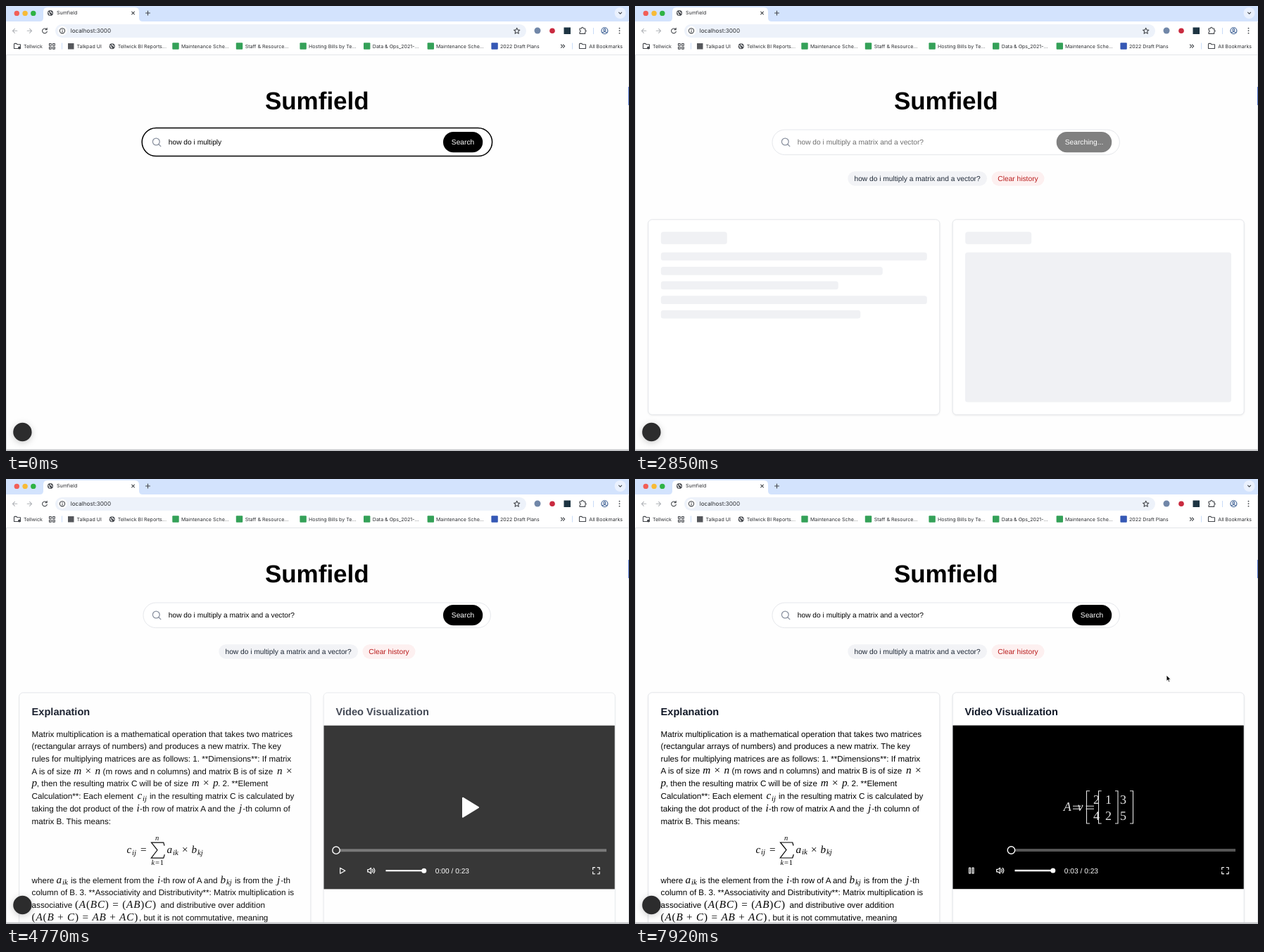
These frames come from a looping animation (885 px wide and 633 px high, 8000 ms). An HTML page:

```html
<!DOCTYPE html>
<html lang="en">
<head>
<meta charset="utf-8">
<title>Sumfield</title>
<style>
html, body { margin: 0; width: 100%; height: 100%; overflow: hidden; background: #fefefe; }
svg { display: block; width: 885px; height: 633px; font-family: "Liberation Sans", Arial, sans-serif; text-rendering: geometricPrecision; }
text { white-space: pre; }
.ui { font: 7.05px Inter, sans-serif; fill: #2b2d31; }
.icon { fill: none; stroke: #45484d; stroke-width: 1.1; stroke-linecap: round; stroke-linejoin: round; }
.small { font-size: 10.21px; }
.body { font-size: 11.67px; }
.title { font-size: 14.58px; font-weight: bold; fill: #111827; }
.math { font-family: "Liberation Serif", serif; letter-spacing: .8px; }
.sub { font-style: italic; letter-spacing: 0; }
.it { font-style: italic; }
.card { fill: #fff; stroke: #e3e5e9; filter: drop-shadow(0 1px 1px #0001); }
.bone { fill: #f0f1f4; }
.line { fill: none; stroke: #fff; stroke-width: 1.2; stroke-linejoin: round; stroke-linecap: round; }
.board { font: 18px "Liberation Serif", serif; fill: #e4e4e4; stroke: #e4e4e4; stroke-width: .8; }
.board path { fill: none; stroke-width: 1.1; }
.board > * { stroke-dasharray: 60; }
</style>
</head>
<body>
<svg viewBox="0 0 885 633">
  <defs>
    <clipPath id="page"><rect x="0" y="70" width="885" height="561"/></clipPath>
    <clipPath id="historyClip"><rect id="historyBox" x="200" y="230" width="500" height="28"/></clipPath>
    <g id="globe"><circle r="4" fill="#4a4d52"/><path d="M-3-1.2Q-1 0-1.6 1.4L0 3M.2-3.2Q-.4-1 1.5-.8L3 .6" fill="none" stroke="#fff" stroke-width="1.1"/></g>
    <path id="folder" class="icon" d="M0 1.2V7.5H9V1.8H4.6L3.4.4H.5Z"/>
  </defs>
  <rect width="885" height="633" fill="#fefefe"/>

  <g id="chrome">
    <rect width="885" height="34" fill="#d3e3fd"/>
    <path d="M0 22H48Q53 22 53 17V8Q53 2 59 2H183Q189 2 189 8V17Q189 22 194 22H885V69H0Z" fill="#fff"/>
    <path d="M0 69.5H885" stroke="#e4e6ea"/>
    <circle cx="15.3" cy="10.4" r="3.7" fill="#f25f57"/><circle cx="27.1" cy="10.4" r="3.7" fill="#f8bb36"/><circle cx="38.8" cy="10.4" r="3.7" fill="#2fb344"/>
    <use href="#globe" x="63" y="10"/>
    <path class="icon" d="M178.7 8.2l3.7 3.7m0-3.7l-3.7 3.7M198.5 10h6m-3-3v6"/>
    <circle cx="872.5" cy="10" r="8" fill="#eaf1fe"/>
    <path class="icon" d="M870.6 9.2l2 2 2-2"/>
    <path class="icon" style="stroke:#b0b3b8" d="M15.8 35.3H9.4m3-3l-3 3 3 3M30.2 35.3h6.4m-3-3l3 3-3 3"/>
    <path class="icon" d="M57.6 33.2a3.4 3.4 0 1 0 .7 3.2M58.2 31.4v2.4h-2.4"/>
    <rect x="70" y="26" width="669" height="19" rx="9.5" fill="#edf2fa"/>
    <circle cx="80" cy="35.3" r="6.8" fill="#fff"/>
    <circle class="icon" cx="80" cy="35.3" r="3.6"/><path class="icon" d="M80 35v2M80 33.4v.1"/>
    <path class="icon" d="M725.7 31.2l1.2 2.7 3 .3-2.2 2 .6 3-2.6-1.6-2.6 1.6.6-3-2.2-2 3-.3z"/>
    <circle cx="755" cy="35" r="4.5" fill="#7187a8"/><circle cx="776" cy="35.3" r="3.8" fill="#c92a3f"/>
    <rect x="792.5" y="30.5" width="9.5" height="9.5" fill="#1d3442"/>
    <path class="icon" d="M815 32h2.5q0-1.8 1.3-1.8t1.3 1.8h2.6v2.4q1.4 0 1.4 1.2t-1.4 1.2v2.6H815v-2.4q1.3 0 1.3-1.2T815 34.5z"/>
    <path d="M834.5 31v9M79.5 52.5v9M804.5 52.5v9" stroke="#c9dcf8"/>
    <g class="icon" style="stroke:#33588f"><circle cx="850.4" cy="35.2" r="4.5"/><circle cx="850.4" cy="34" r="1.5"/><path d="M847.4 38q3-2.4 6 0"/></g>
    <g fill="#45484d"><circle cx="871.5" cy="31.7" r=".9"/><circle cx="871.5" cy="35.2" r=".9"/><circle cx="871.5" cy="38.7" r=".9"/></g>
    <use href="#folder" x="11.5" y="53"/><circle cx="19" cy="59.5" r="2" fill="#45484d"/>
    <path class="icon" d="M61.5 53.5h2.8v2.8h-2.8zM66.5 53.5h2.8v2.8h-2.8zM61.5 58.3h2.8v2.8h-2.8zM66.5 58.3h2.8v2.8h-2.8z"/>
    <rect x="88" y="53" width="8.5" height="8.5" fill="#56585c"/>
    <use href="#globe" x="150.7" y="57.2"/>
    <use href="#folder" x="814.5" y="53"/>
    <path class="icon" d="M788.5 55l2.2 2.2-2.2 2.2m3-4.4l2.2 2.2-2.2 2.2"/>
  </g>

  <g clip-path="url(#page)">
    <text x="441.8" y="147" text-anchor="middle" font-size="35" font-weight="bold">Sumfield</text>
    <rect id="field" fill="#fff"/>
    <g fill="none" stroke="#8c93a1" stroke-width="1.3" stroke-linecap="round"><circle cx="213.3" cy="193" r="4.9"/><path d="M217 196.8l2.8 2.8"/></g>
    <text id="query" class="small" x="230.8" y="197.2"></text>
    <rect id="caret" y="187.5" width="1" height="12.5"/>
    <rect id="button" y="179" height="29.3" rx="14.6"/>
    <text id="buttonText" class="small" y="197.2" text-anchor="middle" fill="#fff"></text>

    <g id="history" clip-path="url(#historyClip)" class="small" text-anchor="middle">
      <g class="pill"><rect x="302.3" y="235.2" width="197.7" height="20.6" rx="10.3" fill="#f2f3f6"/><text x="401.1" y="249" fill="#1f2937">how do i multiply a matrix and a vector?</text></g>
      <g class="pill"><rect x="506.5" y="235.2" width="75" height="20.6" rx="10.3" fill="#fdf0f0"/><text x="544" y="249" fill="#b91c1c">Clear history</text></g>
    </g>
    <g id="skeleton"></g>

    <g id="explanation">
      <rect class="card" x="18.8" y="303.8" width="414" height="400" rx="5.5"/>
      <text class="title" x="36.6" y="336.3">Explanation</text>
    </g>

    <g id="video">
      <rect class="card" x="451.2" y="303.8" width="414" height="400" rx="5.5"/>
      <text class="title" x="468.6" y="336.3">Video Visualization</text>
      <rect x="451.5" y="350.5" width="413.2" height="232.7"/>
      <path id="bigPlay" d="M649 453.5L671 467 649 480.5Z" fill="#fff" stroke="#fff" stroke-width="2" stroke-linejoin="round"/>
      <g class="board" id="matrix">
        <text x="608.7" y="471.8" class="it">A</text><path d="M622 465.3h11.5M622 469.3h11.5"/>
        <path d="M646 443.7H641.5V490H646"/><text x="651" y="461.8">2</text><text x="689" y="461.8">3</text>
        <text x="651" y="485">4</text><text x="689" y="485">5</text><path d="M703 443.7H707.5V490H703"/>
      </g>
      <g class="board" id="vector">
        <text x="628.6" y="471.8" class="it">v</text><path d="M640.5 465.3h11.5M640.5 469.3h11.5"/>
        <path d="M662.7 443.7H658.5V490H662.7"/><text x="668" y="461.8">1</text><text x="668" y="485">2</text>
        <path d="M682 443.7H686V490H682"/>
      </g>
      <path id="track" stroke="#555" stroke-width="4"/>
      <circle id="knob" cy="528" r="5.2" stroke="#fff" stroke-width="1.4"/>
      <path id="playIcon" class="line" d="M474.7 553L481.8 557 474.7 561Z"/>
      <path id="pauseIcon" class="line" d="M474.6 553h2v8h-2zM479.1 553h2v8h-2z"/>
      <path class="line" d="M513.7 555.4h2l2.8-2.3v8l-2.8-2.3h-2zM520.6 555q1.6 2 0 4M522.3 553.5q3 3.5 0 7"/>
      <path d="M539.5 557H594" stroke="#fff" stroke-width="2.4"/><circle cx="593.8" cy="557" r="3.5" fill="#fff"/>
      <text id="clock" class="small" x="609.8" y="560.5" fill="#fff"></text>
      <path class="line" d="M833.7 555.3v-2.8h2.8M840.3 552.5h2.8v2.8M843.1 558.8v2.8h-2.8M836.5 561.6h-2.8v-2.8"/>
    </g>
  </g>

  <path d="M.5 70V631M884.5 23V631" stroke="#dcdde0"/>
  <rect y="630.6" width="885" height="2.4" fill="#c4c5c8"/>
  <rect x="884" y="115" width="1" height="26" fill="#4c6fc5"/>
  <circle cx="23.4" cy="606" r="13.2" fill="#2c2c2d" style="filter:drop-shadow(0 2px 5px #0003)"/>
  <path id="pointer" d="M0 0V8.6L2 6.8 3.4 9.9 4.9 9.2 3.5 6.2H6.1Z" stroke="#fff" stroke-width=".9"/>
</svg>
<script>
const LOOP = 8000, TICK = 1000 / 13;
const $ = id => document.getElementById(id);
const add = (id, html) => $(id).insertAdjacentHTML('beforeend', html);
const set = (id, attrs) => { for (const key in attrs) $(id).setAttribute(key, attrs[key]); };
const show = (id, on) => { $(id).style.display = on ? '' : 'none'; };
const clamp = v => Math.max(0, Math.min(1, v));
const escape = s => s.replace(/&/g, '&amp;');

// Browser labels: [x, text, icon x, icon colour]
const GREEN = '#34a158';
for (const [x, label, iconX, color] of [
  [25, 'Tellwick'], [100.5, 'Talkpad UI'], [158.7, 'Tellwick BI Reports...'],
  [249, 'Maintenance Sche...', 236.3, GREEN], [339.7, 'Staff & Resource...', 326.8, GREEN],
  [430, 'Hosting Bills by Te...', 417.4, GREEN], [520.8, 'Data & Ops_2021-...', 508, GREEN],
  [611, 'Maintenance Sche...', 598.6, GREEN], [702, '2022 Draft Plans', 689.4, '#3558b5'],
  [828.3, 'All Bookmarks']
]) {
  add('chrome', `<text class="ui" x="${x}" y="59.5">${escape(label)}</text>`);
  if (color) add('chrome', `<rect x="${iconX}" y="52.3" width="9.4" height="9.4" rx="1" fill="${color}"/>`);
}
add('chrome', '<text class="ui" x="72" y="12.4">Sumfield</text><text class="ui" x="91.8" y="38.2" style="font-size:8.1px">localhost:3000</text>');

// Loading placeholders
const bone = (x, y, w, h) => `<rect class="bone" x="${x}" y="${y}" width="${w}" height="${h}" rx="3.5"/>`;
for (const x of [18.8, 451.2])
  add('skeleton', `<rect class="card" x="${x}" y="303.8" width="414" height="277.5" rx="5.5"/>` + bone(x + 18, 321.2, 94, 17.5));
[378, 315, 252, 378, 283.5].forEach((w, i) => add('skeleton', bone(36.8, 350.4 + i * 20.6, w, 11.7)));
add('skeleton', bone(469, 350.5, 378, 213));

// Article: each row is a baseline followed by x, text pairs; a leading $ marks math
function mathText(x, y, source, size = 15.2) {
  const [main, sub] = source.split('_');
  const italic = main.replace(/[a-z]/gi, '<tspan class="it">$&</tspan>');
  const lower = sub ? `<tspan class="sub" dy="2.4" font-size="${size * .72}">${sub}</tspan>` : '';
  return `<text class="math" x="${x}" y="${y}" font-size="${size}">${italic}${lower}</text>`;
}
for (const [y, ...parts] of [
  [366.7, 36.6, 'Matrix multiplication is a mathematical operation that takes two matrices'],
  [384.2, 36.6, '(rectangular arrays of numbers) and produces a new matrix. The key'],
  [401.8, 36.6, 'rules for multiplying matrices are as follows: 1. **Dimensions**: If matrix'],
  [419.4, 36.6, 'A is of size', 96.2, '$m × n', 137.6, '(m rows and n columns) and matrix B is of size', 385, '$n ×'],
  [437.3, 36.6, '$p', 43.8, ', then the resulting matrix C will be of size', 263.7, '$m × p', 301, '. 2. **Element'],
  [455.2, 36.6, 'Calculation**: Each element', 186.5, '$c_ij', 204, 'in the resulting matrix C is calculated by'],
  [473.2, 36.6, 'taking the dot product of the', 185.5, '$i', 190, '-th row of matrix A and the', 331, '$j', 336.3, '-th column of'],
  [491, 36.6, 'matrix B. This means:'],
  [532, 171.5, '$c_ij', 191, '$=', 228.5, '$a_ik', 250, '$×', 263.5, '$b_kj'],
  [574.6, 36.6, 'where', 71.5, '$a_ik', 92, 'is the element from the', 215, '$i', 219.5, '-th row of A and', 304.5, '$b_kj', 325, 'is from the', 385, '$j', 390.3, '-th'],
  [592.3, 36.6, 'column of B. 3. **Associativity and Distributivity**: Matrix multiplication is'],
  [610.2, 36.6, 'associative', 98, '$(A(BC) = (AB)C)', 219.5, 'and distributive over addition'],
  [628.2, 36.6, '$(A(B + C) = AB + AC)', 189, ', but it is not commutative, meaning']
])
  for (let i = 0; i < parts.length; i += 2) {
    const [x, text] = [parts[i], parts[i + 1]];
    add('explanation', text[0] === '$' ? mathText(x, y, text.slice(1)) : `<text class="body" x="${x}" y="${y}">${text}</text>`);
  }
add('explanation', mathText(212, 514, 'n', 10.5) + mathText(206.5, 548.5, 'k=1', 10.5) +
  '<path d="M225 521.5L223.8 517H206.5L215 527.6 206.3 539H223.8L225.3 534" fill="none" stroke="#000" stroke-width="1.2"/>');

// Timing tables, in ms
const QUERY = 'how do i multiply a matrix and a vector?', TYPED = 17;
const KEYS = [150, 230, 310, 380, 460, 540, 620, 690, 850, 850, 920, 1000, 1000, 1080, 1150, 1230,
  1380, 1620, 1690, 1850, 1920, 2080, 2380];
const SUBMIT = 2540, ANSWER = 4310, CLEAR = 4380, REVEAL = 4620, PLAY = 5770, ROLL = 5840;
const POINTER = [[5080, 749, 285], [5310, 689, 413], [5380, 689, 413], [5540, 665, 460], [5690, 662, 464],
  [6380, 662, 464], [6620, 700, 400], [6850, 742, 300], [7080, 755, 279]];

function along(path, t) {
  if (t <= path[0][0]) return path[0].slice(1);
  const i = path.findIndex(p => p[0] >= t);
  if (i < 0) return path[path.length - 1].slice(1);
  const [a, b] = [path[i - 1], path[i]], k = (t - a[0]) / (b[0] - a[0]);
  return [a[1] + (b[1] - a[1]) * k, a[2] + (b[2] - a[2]) * k];
}
const easeOut = (t, start, length) => 1 - (1 - clamp((t - start) / length)) ** 3;

// Trace each outline in turn, then fill it
function write(id, progress) {
  const glyphs = [...$(id).children], lag = .25;
  show(id, progress > 0);
  glyphs.forEach((glyph, i) => {
    const p = clamp(progress * (1 + lag * (glyphs.length - 1)) - lag * i);
    const fill = clamp(p * 2 - 1);
    glyph.style.strokeDashoffset = 60 * (1 - clamp(p * 2));
    glyph.style.fillOpacity = fill;
    if (glyph.tagName === 'text') glyph.style.strokeOpacity = 1 - fill;
  });
}

function drawSearch(t) {
  const typing = t < SUBMIT, busy = !typing && t < ANSWER;
  $('query').textContent = QUERY.slice(0, TYPED + KEYS.filter(k => k <= t).length);
  set('query', { fill: busy ? '#6f6f6f' : '#000' });
  show('caret', typing && t >= 80);
  set('caret', { x: 231 + $('query').getComputedTextLength() });
  set('field', typing
    ? { x: 193.2, y: 173.6, width: 497.4, height: 40, rx: 20, stroke: '#000', 'stroke-width': 1.5 }
    : { x: 195, y: 176, width: 493.4, height: 35.6, rx: 17.8, stroke: '#e5e7eb', 'stroke-width': 1 });
  set('button', busy ? { x: 598.7, width: 78.5, fill: '#808080' } : { x: 621, width: 56.2, fill: '#000' });
  $('buttonText').textContent = busy ? 'Searching...' : 'Search';
  set('buttonText', { x: busy ? 638 : 649 });
}

function drawResults(t) {
  const open = easeOut(t, SUBMIT, 300);
  show('history', t >= SUBMIT);
  $('history').style.opacity = open * open;
  set('historyBox', { height: 5 + 21 * open });
  document.querySelectorAll('.pill').forEach((pill, i) => {
    const x = i ? 544 : 401.1, s = .92 + .08 * open;
    pill.setAttribute('transform', `translate(${x} 245.5) scale(${s}) translate(${-x} -245.5)`);
  });
  show('skeleton', t >= SUBMIT && t < CLEAR);
  set('skeleton', { transform: `translate(0 ${-21 * (1 - open)})`, opacity: clamp(open * 1.5) });

  const shift = 5 * (1 - easeOut(t, REVEAL - 40, 280));
  [['explanation', 95], ['video', 5]].forEach(([id, lead]) => {
    show(id, t >= REVEAL);
    set(id, { transform: `translate(0 ${shift})`, opacity: easeOut(t, REVEAL - lead, 390) });
  });
}

function drawVideo(t) {
  const playing = t >= PLAY;
  show('bigPlay', !playing);
  show('playIcon', !playing);
  show('pauseIcon', playing);
  const beat = .28, seconds = Math.floor(Math.max(0, t - ROLL) * .00192 / beat) * beat;
  const x = 469 + 384 * seconds / 23;
  set('knob', { cx: x });
  set('track', { d: `M${x + 5} 528H853` });
  $('clock').textContent = `0:0${Math.floor(seconds)} / 0:23`;
  write('matrix', clamp((t - 5880) / 820));
  write('vector', clamp((t - 6980) / 870));
  const [px, py] = along(POINTER, t);
  show('pointer', t >= POINTER[0][0]);
  set('pointer', { transform: `translate(${px} ${py})` });
}

// Thirteen pictures a second, each timed to the nearest 10 ms like the tables
function frame() {
  const step = Math.floor((performance.now() % LOOP + 5) / TICK);
  const t = Math.round(step * TICK / 10) * 10;
  drawSearch(t);
  drawResults(t);
  drawVideo(t);
  requestAnimationFrame(frame);
}
frame();
</script>
</body>
</html>
```
